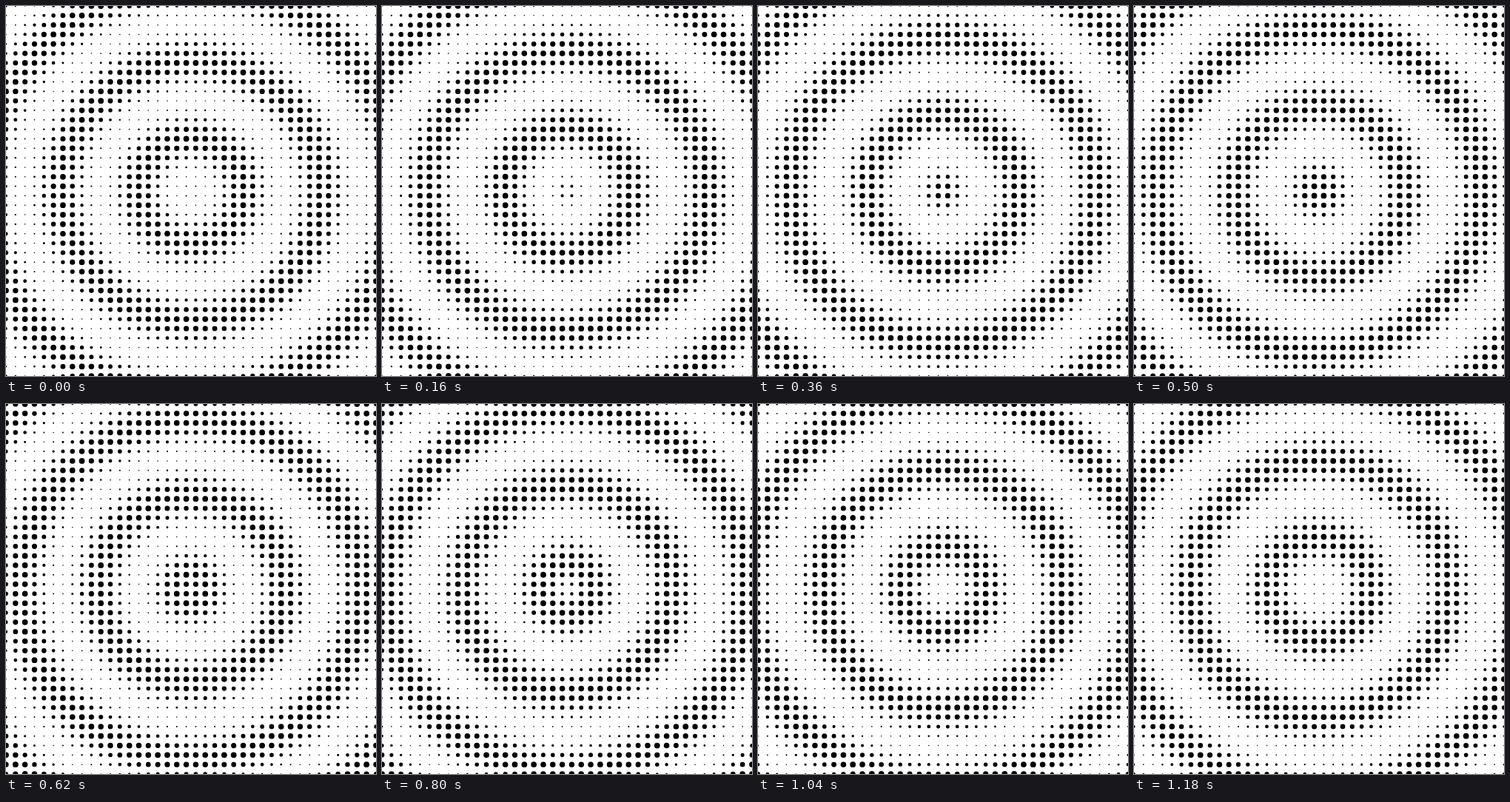
Write an HTML page with a canvas that moves like this. It is 500 px wide and 500 px high and loops after 1.2 s.

```html
<!DOCTYPE html>
<html lang="en">
<head>
<meta charset="utf-8">
<title>Halftone ripple</title>
<style>
  html, body { margin: 0; width: 100%; height: 100%; overflow: hidden; background: #fff; }
  canvas { display: block; }
</style>
</head>
<body>
<canvas id="stage" width="500" height="500"></canvas>
<script>
const ctx = document.getElementById('stage').getContext('2d');
const SIZE = 500, DOTS = 40, LOOP = 1200;
const GAP = SIZE / (DOTS - 1);
const WAVE = 0.06;          // radians per pixel from the centre
const START = 4.25;         // phase of the first crest
const MIN_R = 0.75, MAX_R = 3.9;

function draw(time) {
  const phase = START + 2 * Math.PI * (time % LOOP) / LOOP;
  ctx.fillStyle = '#fff';
  ctx.fillRect(0, 0, SIZE, SIZE);
  ctx.fillStyle = '#000';
  ctx.beginPath();
  for (let row = 0; row < DOTS; row++) {
    for (let col = 0; col < DOTS; col++) {
      const x = col * GAP, y = row * GAP;
      const dist = Math.hypot(x - SIZE / 2, y - SIZE / 2);
      const level = (1 + Math.cos(WAVE * dist - phase)) / 2;
      const r = MIN_R + (MAX_R - MIN_R) * level;
      ctx.moveTo(x + r, y);
      ctx.arc(x, y, r, 0, 2 * Math.PI);
    }
  }
  ctx.fill();
}

function tick() {
  draw(performance.now());
  requestAnimationFrame(tick);
}
tick();
</script>
</body>
</html>
```
